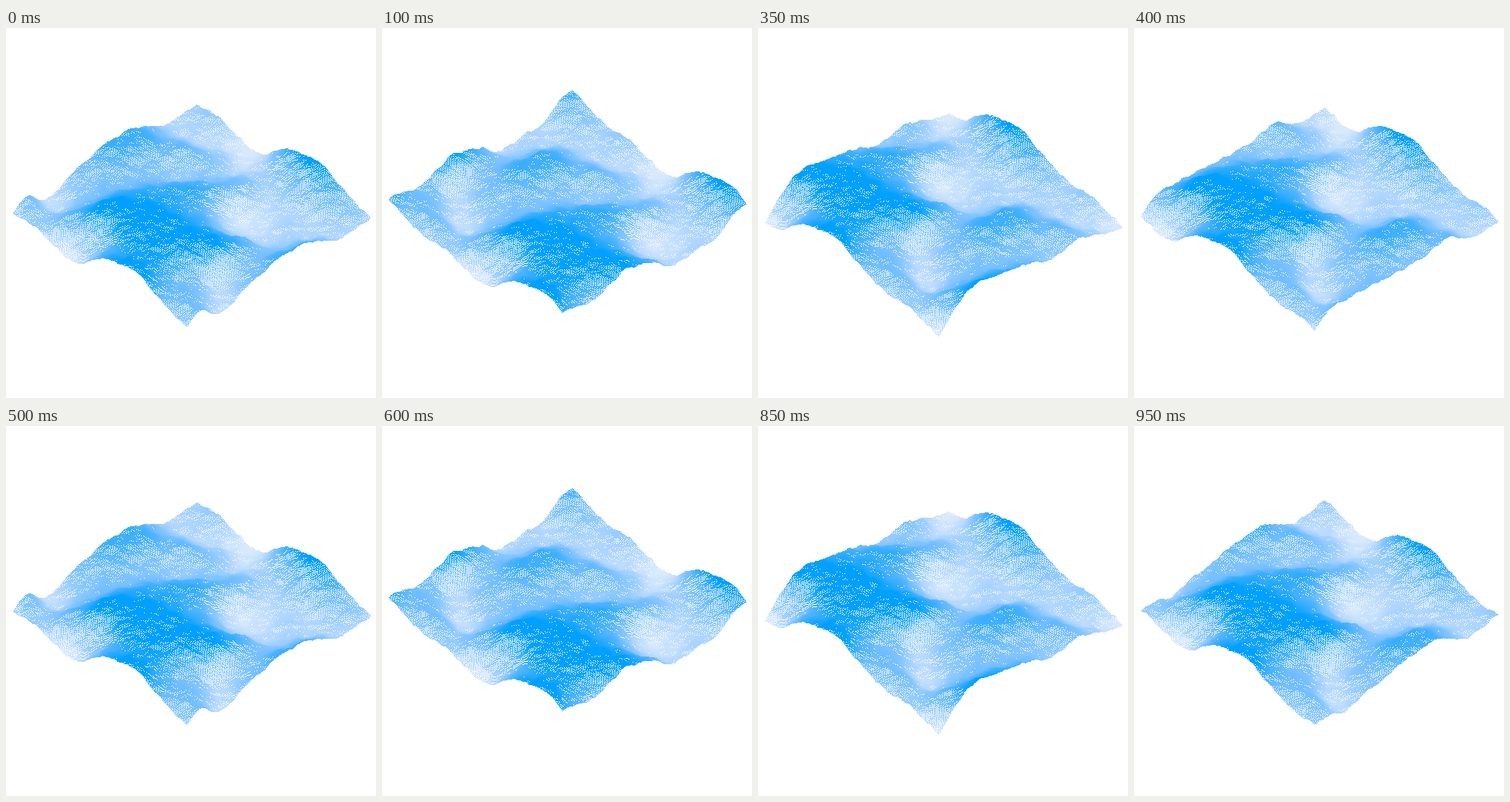
An HTML page with a canvas for the animation above (1 s loop, 480 by 480 pixels).

```html
<!DOCTYPE html>
<html lang="en">
<head>
<meta charset="utf-8">
<title>Scrolling terrain</title>
<style>
  html, body { margin: 0; width: 100%; height: 100%; overflow: hidden; background: #fff; }
  canvas { display: block; width: 480px; height: 480px; }
</style>
</head>
<body>
<canvas id="stage" width="480" height="480"></canvas>
<script>
const SIZE = 480, N = 310, STEPS = 10, STEP_MS = 50;

// Screen position of the far corner and of the two ground axes.
const ORIGIN = [247, 97], U = [225, 147.5], V = [-238, 141.5];

// Relief in pixels: rows run along u, columns along v; both wrap around.
const RELIEF = [
  [0, -4, -5, 6, 15, 17, 17, 11, 5, -4, -8, 9],
  [0, -3, -5, 6, 15, 14, 13, 9, 4, 1, -6, 1],
  [-5, -7, -5, 11, 9, 5, 5, 7, 10, 10, 12, 9],
  [-12, -10, 0, 6, 0, 3, 12, 17, 21, 25, 25, 8],
  [-6, -10, -6, 0, 6, 16, 19, 20, 24, 27, 24, 6],
  [15, -1, -1, 9, 11, 15, 17, 20, 27, 29, 27, 16],
  [24, 6, -4, -5, -10, -6, 10, 19, 25, 28, 25, 22],
  [29, 12, -2, -8, -10, -8, 4, 20, 26, 27, 22, 22],
  [18, 11, -4, -3, -6, -4, 12, 20, 25, 17, 11, 13],
  [5, 3, -4, -5, 0, 3, 8, 6, 0, -6, 5, 10]
];

// Height to colour stops.
const RAMP = [
  [-13, 216, 233, 252],
  [-5, 176, 214, 255],
  [3, 136, 199, 255],
  [10, 114, 190, 255],
  [17, 66, 176, 252],
  [25, 0, 160, 255]
];

let seed = 71;
function random() {
  seed = (seed * 16807) % 2147483647;
  return seed / 2147483647;
}

function noiseGrid(n, amp) {
  return Array.from({ length: n }, () =>
    Array.from({ length: n }, () => (random() * 2 - 1) * amp));
}

function cubic(a, b, c, d, t) {
  return b + 0.5 * t * (c - a + t * (2 * a - 5 * b + 4 * c - d + t * (3 * (b - c) + d - a)));
}

// Smooth lookup in a wrapping grid, u and v in 0..1.
function sample(grid, u, v) {
  const rows = grid.length, cols = grid[0].length;
  const x = u * rows, y = v * cols;
  const i = Math.floor(x), j = Math.floor(y);
  const along = r => {
    const row = grid[(i + r + rows) % rows];
    const at = c => row[(j + c + cols) % cols];
    return cubic(at(-1), at(0), at(1), at(2), y - j);
  };
  return cubic(along(-1), along(0), along(1), along(2), x - i);
}

function shade(h) {
  let k = 1;
  while (k < RAMP.length - 1 && h > RAMP[k][0]) k++;
  const lo = RAMP[k - 1], hi = RAMP[k];
  const t = Math.min(1, Math.max(0, (h - lo[0]) / (hi[0] - lo[0])));
  const mix = c => Math.round(lo[c] + (hi[c] - lo[c]) * t);
  return (255 << 24 | mix(3) << 16 | mix(2) << 8 | mix(1)) >>> 0;
}

const heights = new Float32Array(N * N);
const colors = new Uint32Array(N * N);
const coarse = noiseGrid(31, 1.9), fine = noiseGrid(80, 0.8);

for (let i = 0; i < N; i++) {
  for (let j = 0; j < N; j++) {
    const u = i / N, v = j / N;
    const base = sample(RELIEF, u, v), bump = sample(coarse, u, v);
    heights[i * N + j] = base + bump + sample(fine, u, v);
    colors[i * N + j] = shade(base + bump * 0.6);
  }
}

const ctx = document.getElementById("stage").getContext("2d");
const image = ctx.createImageData(SIZE, SIZE);
const pixels = new Uint32Array(image.data.buffer);

// One dot per terrain cell, far to near; steep near slopes leave gaps.
function draw(step) {
  pixels.fill(0xffffffff);
  const shift = step * N / STEPS;
  for (let i = 0; i < N; i++) {
    const row = (i - shift + N) % N * N;
    const a = i / (N - 1);
    for (let j = 0; j < N; j++) {
      const b = j / (N - 1);
      const x = Math.round(ORIGIN[0] + U[0] * a + V[0] * b);
      const y = Math.round(ORIGIN[1] + U[1] * a + V[1] * b - heights[row + j]);
      pixels[y * SIZE + x] = colors[row + j];
    }
  }
  ctx.putImageData(image, 0, 0);
}

let shown = -1;
const start = performance.now();
function tick() {
  const step = Math.floor((performance.now() - start) / STEP_MS) % STEPS;
  if (step !== shown) draw(shown = step);
  requestAnimationFrame(tick);
}
tick();
</script>
</body>
</html>
```
